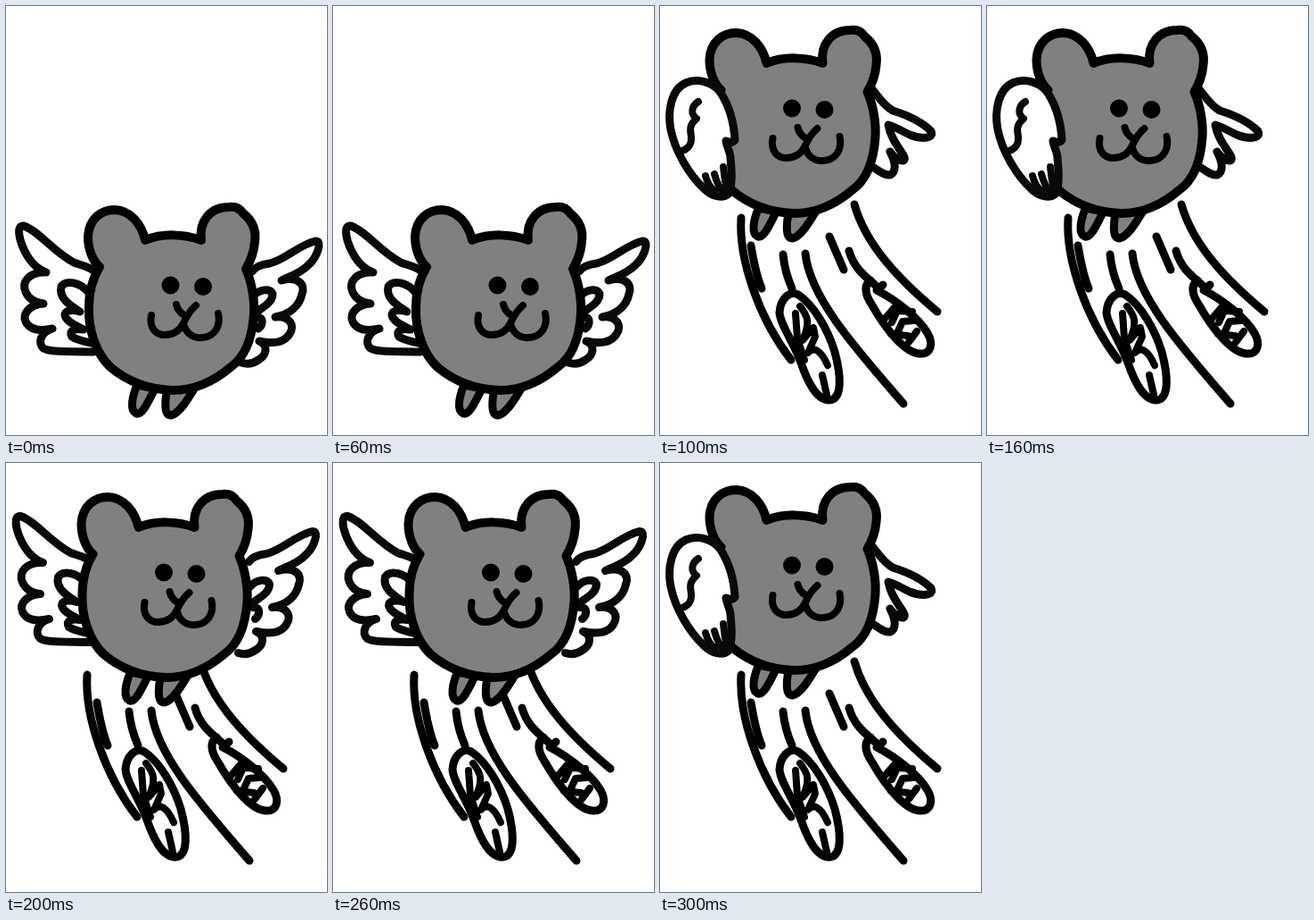
Write an HTML page that moves like this. It is 360x480 px and loops after 400 ms.

```html
<!DOCTYPE html>
<html lang="en">
<head>
<meta charset="utf-8">
<title>Flapping bear</title>
<style>
  html, body { margin: 0; width: 100%; height: 100%; overflow: hidden; background: #fff; }
  svg { display: block; width: 100vw; height: 100vh; }
  path { fill: none; stroke: #000; stroke-width: 9; stroke-linecap: round; stroke-linejoin: round; }
  .wing path { stroke: #090909; }
  .wing .white { fill: #fff; }
  .fur { fill: #808080; }
  .head { stroke-width: 10; }
  .mouth, .thin { stroke-width: 8; }
</style>
</head>
<body>
<svg viewBox="0 0 360 480">
  <g id="trail">
    <path d="M91 237C88 285 112 351 147 396M102 268C105 286 108 302 114 316M138 278Q140 298 148 316"/>
    <path d="M163 277C168 327 222 386 273 445M190 258L206 295M218 222C231 268 269 307 311 342M212 274C217 292 228 301 241 312"/>
    <path d="M134 343C135 327 146 318 155 323C172 334 188 361 196 387C203 413 205 440 190 441C175 441 165 419 158 399C150 376 135 357 134 343Z"/>
    <path class="thin" d="M152 344L154 372L162 396M157 336C167 348 168 356 160 374L172 360L174 370L166 388C172 381 180 384 188 402M182 413L187 435"/>
    <path d="M236 307C228 313 230 323 238 335C254 363 275 388 291 389C304 390 307 378 300 366C290 349 265 329 243 318L250 312"/>
    <path class="thin" d="M264 336L252 350M283 342L266 341L260 354M266 366L272 353L284 352M259 367L278 369M288 364L279 376"/>
  </g>

  <g id="spread" class="wing">
    <path class="white" d="M103 300C96 292 84 290 76 287C53 275 37 252 20 246C12 245 14 258 19 270C25 284 34 294 45 298C27 297 17 308 22 320C26 329 33 332 42 333C27 334 18 344 22 353C27 363 39 364 52 361C39 365 35 377 42 383C50 388 75 386 98 387"/>
    <path d="M92 320C83 309 67 306 62 314C59 326 70 334 83 342C73 339 66 341 66 346C68 354 78 357 87 362C76 360 70 364 74 370C80 374 88 375 95 377"/>
    <path class="white" d="M276 297C280 291 288 289 296 288C315 283 327 268 347 263C356 263 348 281 341 288C333 297 322 301 309 307C328 302 336 312 332 322C329 336 318 345 302 348C317 346 325 357 318 367C312 377 298 378 284 375C295 380 292 391 283 396C276 401 270 401 264 399"/>
    <path d="M277 325C284 317 296 315 299 322C299 332 288 337 280 343M280 348C289 347 289 356 283 361"/>
  </g>

  <g id="foldedBack" class="wing">
    <path class="white" d="M237 92C244 100 250 111 261 117C277 122 292 128 304 140C308 149 292 149 280 144C271 140 264 135 256 133C259 150 269 159 274 169C276 177 264 172 258 163C265 176 265 186 258 189C251 190 246 184 238 180"/>
  </g>

  <g id="bear">
    <path class="fur" d="M147 424C142 436 138 452 146 456C153 458 160 442 167 428ZM181 427C178 443 177 458 185 458C194 456 203 442 213 425Z"/>
    <path class="fur head" d="M105 292C97 285 92 272 92 258C93 238 107 228 122 228C140 229 152 244 156 262C175 254 200 255 219 262C216 241 229 225 250 225C257 224 262 226 266 232C276 240 281 251 279 264C278 276 275 284 269 294C276 310 279 330 278 345C276 372 268 393 252 404C232 421 212 430 187 430C160 429 136 420 117 404C101 389 92 362 93 337C93 320 97 305 105 292Z"/>
    <circle cx="184.500" cy="312.500" r="10"/>
    <circle cx="221" cy="314" r="10"/>
    <path class="mouth" d="M163 346C160 361 169 368 178 368C188 368 195 363 199 355C202 367 210 372 220 371C235 370 241 357 238 344M191 334Q193 342 200 346M213 335C206 341 202 348 199 355"/>
  </g>

  <g id="foldedFront" class="wing">
    <path class="white" d="M68 97C61 86 43 80 29 86C13 93 8 117 12 138C17 163 33 189 49 204C58 213 70 216 77 210C82 199 80 181 79 170C79 164 75 158 74 151Q81 154 84 150C83 131 77 111 68 97Z"/>
    <path class="thin" d="M43 107C35 112 34 121 41 126C32 134 34 139 35 146C36 155 31 160 25 162M51 190Q54 201 61 207M61 188Q64 199 70 208M71 180Q72 194 76 208"/>
  </g>
</svg>
<script>
  const STEP = 100;
  const part = id => document.getElementById(id);
  const low = { bear: [0, 0], spread: [0, 0] };
  const folded = { bear: [-36.5, -198], trail: [0, 0], foldedBack: [0, 0], foldedFront: [0, 0] };
  const high = { bear: [-7.5, -190], spread: [-3.5, -186.5], trail: [0, 0] };
  const poses = [low, folded, high, folded];
  const parts = ["trail", "spread", "foldedBack", "bear", "foldedFront"];

  function show(pose) {
    for (const id of parts) {
      const offset = pose[id];
      part(id).style.display = offset ? "" : "none";
      if (offset) part(id).setAttribute("transform", `translate(${offset})`);
    }
  }

  const start = performance.now();
  function tick() {
    const elapsed = performance.now() - start;
    show(poses[Math.floor(elapsed / STEP) % poses.length]);
    requestAnimationFrame(tick);
  }
  tick();
</script>
</body>
</html>
```
